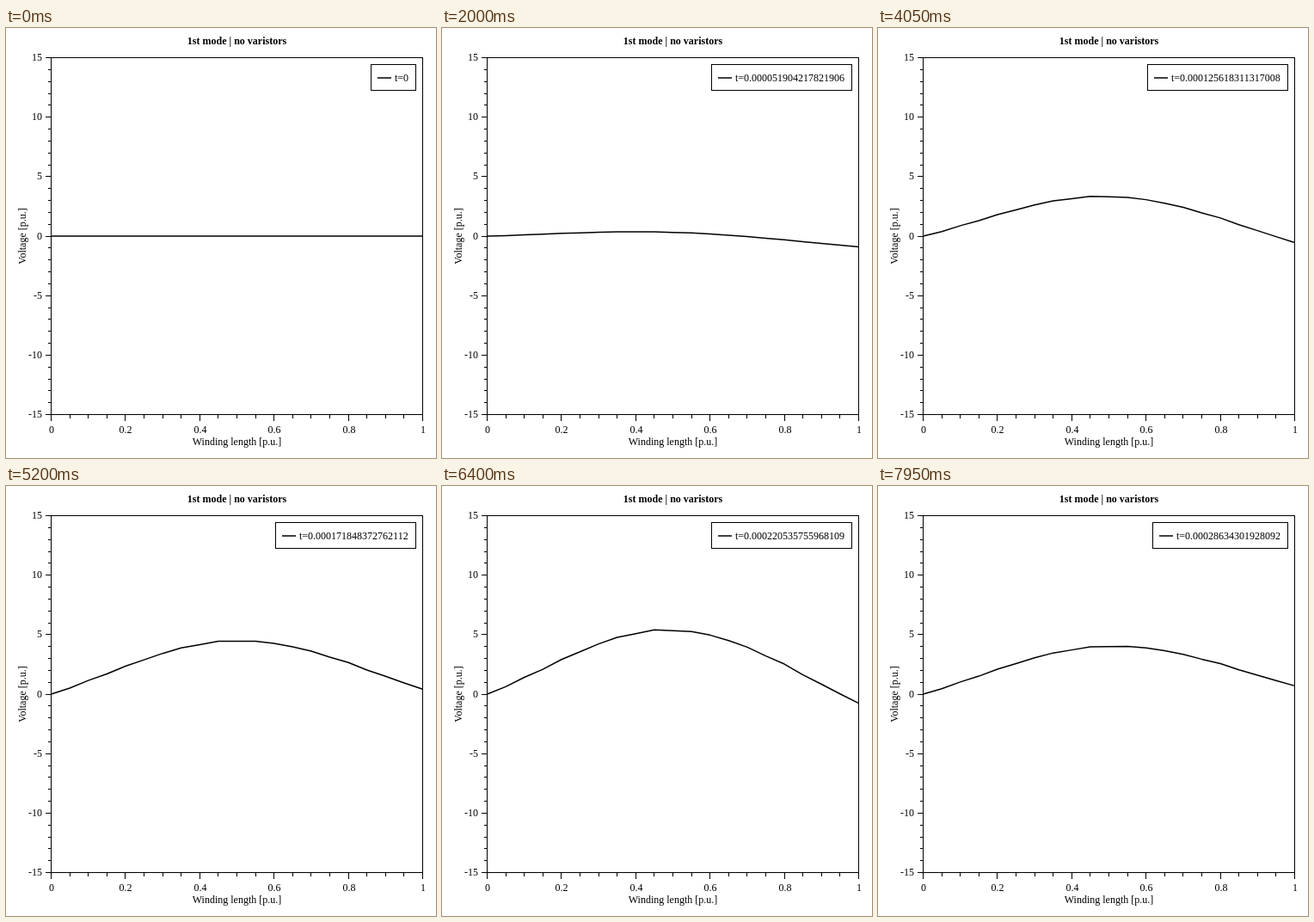
An HTML page that plays this animation: 500x500 px, repeating every 8000 ms.

```html
<!DOCTYPE html>
<html lang="en">
<head>
<meta charset="utf-8">
<title>Winding voltage</title>
<style>
  html, body { margin: 0; width: 100%; height: 100%; overflow: hidden; background: #fff; }
  svg { display: block; width: 100vw; height: 100vh; }
  text { font: 12px "Liberation Serif", "Times New Roman", serif; fill: #000; }
  .bold { font-weight: bold; }
  .thin { fill: none; stroke: #000; stroke-width: 1; shape-rendering: crispEdges; }
  .curve { fill: none; stroke: #000; stroke-width: 1.5; stroke-linejoin: round; }
</style>
</head>
<body>
<svg id="stage" viewBox="0 0 500 500"></svg>
<script>
const stage = document.getElementById('stage');
const LOOP = 8000, STEP = 50;
const BOX = { left: 52.5, right: 484.5, top: 34.5, bottom: 449.5 };
const px = x => BOX.left + x * (BOX.right - BOX.left);
const py = v => (BOX.top + BOX.bottom) / 2 - v * (BOX.bottom - BOX.top) / 30;

function add(tag, attrs, text) {
  const el = document.createElementNS('http://www.w3.org/2000/svg', tag);
  for (const key in attrs) el.setAttribute(key, attrs[key]);
  if (text !== undefined) el.textContent = text;
  stage.appendChild(el);
  return el;
}

const label = (x, y, text, anchor = 'middle', extra = {}) =>
  add('text', { x, y, 'text-anchor': anchor, ...extra }, text);

// Axes
add('rect', { class: 'thin', x: BOX.left, y: BOX.top,
  width: BOX.right - BOX.left, height: BOX.bottom - BOX.top });
let ticks = '';
for (let v = -15; v <= 15; v++) {
  const major = v % 5 === 0;
  const y = Math.floor(py(v)) + 0.5;
  ticks += `M${BOX.left} ${y}h${major ? -7 : -4}`;
  if (major) label(42, y + 3.5, v, 'end');
}
for (let i = 0; i <= 20; i++) {
  const major = i % 4 === 0;
  const x = Math.floor(px(i / 20)) + 0.5;
  ticks += `M${x} ${BOX.bottom}v${major ? 7 : 4}`;
  if (major) label(x + 0.5, 471, i / 20);
}
add('path', { class: 'thin', d: ticks });
label(268.5, 19, '1st mode | no varistors', 'middle', { class: 'bold' });
label(268.5, 485, 'Winding length [p.u.]');
label(0, 0, 'Voltage [p.u.]', 'middle', { transform: 'translate(23 242) rotate(-90)' });

const curve = add('path', { class: 'curve' });
const legendBox = add('rect', { class: 'thin', y: 42.5, height: 30 });
const legendLine = add('path', { class: 'curve' });
const legendText = label(0, 62, '', 'start');

// Simulated time (s) at a few steps, joined by a smooth cubic
const knots = [
  [0, 0], [40, 0.000051904217821906], [57, 8.12104909091234e-5],
  [81, 0.000125618311317008], [104, 0.000171848372762112],
  [128, 0.000220535755968109], [159, 0.00028634301928092]
];
const gaps = knots.slice(1).map((k, i) => k[0] - knots[i][0]);
const rates = gaps.map((g, i) => (knots[i + 1][1] - knots[i][1]) / g);
const last = gaps.length;
const slopes = knots.map((k, i) => i === 0 || i === last ? 0 :
  (rates[i - 1] * gaps[i] + rates[i] * gaps[i - 1]) / (gaps[i - 1] + gaps[i]));
slopes[0] = 2 * rates[0] - slopes[1];
slopes[last] = 2 * rates[last - 1] - slopes[last - 1];

function simTime(n) {
  let i = 0;
  while (i < last - 1 && n >= knots[i + 1][0]) i++;
  const g = gaps[i], s = (n - knots[i][0]) / g, r = 1 - s;
  return knots[i][1] * r * r * (1 + 2 * s) + knots[i + 1][1] * s * s * (3 - 2 * s) +
    g * s * r * (slopes[i] * r - slopes[i + 1] * s);
}

// Up to 15 digits; scientific when the plain form exceeds 20 characters
function format(t) {
  if (t === 0) return '0';
  const [mant, exp] = t.toExponential(14).split('e-');
  const digits = mant.replace(/\.?0+$/, '');
  const plain = '0.' + '0'.repeat(exp - 1) + digits.replace('.', '');
  return plain.length <= 20 ? plain : digits + 'E-' + exp.padStart(2, '0');
}

// Mode shape along the winding
const shape = [0, 0.115, 0.26, 0.385, 0.535, 0.655, 0.777, 0.88, 0.94, 1.003, 0.998,
  0.992, 0.947, 0.873, 0.783, 0.66, 0.548, 0.395, 0.265, 0.13, 0];
const rad = Math.PI / 180;

function draw(ms) {
  const n = Math.floor((ms % LOOP) / STEP);
  const t = simTime(n), us = t * 1e6;
  // Driven end, and a resonant mode that grows and slowly slips in phase
  const drive = Math.sin(53.278 * us * rad);
  const mode = -0.031 * us * Math.cos(53.203 * us * rad);
  curve.setAttribute('d', 'M' + shape.map((g, i) => {
    const x = i / 20;
    return px(x).toFixed(2) + ' ' + py(x * drive + g * mode).toFixed(2);
  }).join('L'));

  legendText.textContent = 't=' + format(t);
  const left = Math.round(440 - legendText.getComputedTextLength());
  legendText.setAttribute('x', left + 28);
  legendBox.setAttribute('x', left + 0.5);
  legendBox.setAttribute('width', 476 - left);
  legendLine.setAttribute('d', `M${left + 8} 58h16`);
}

const start = performance.now();
function tick() {
  draw(performance.now() - start);
  requestAnimationFrame(tick);
}
draw(0);
requestAnimationFrame(tick);
</script>
</body>
</html>
```
